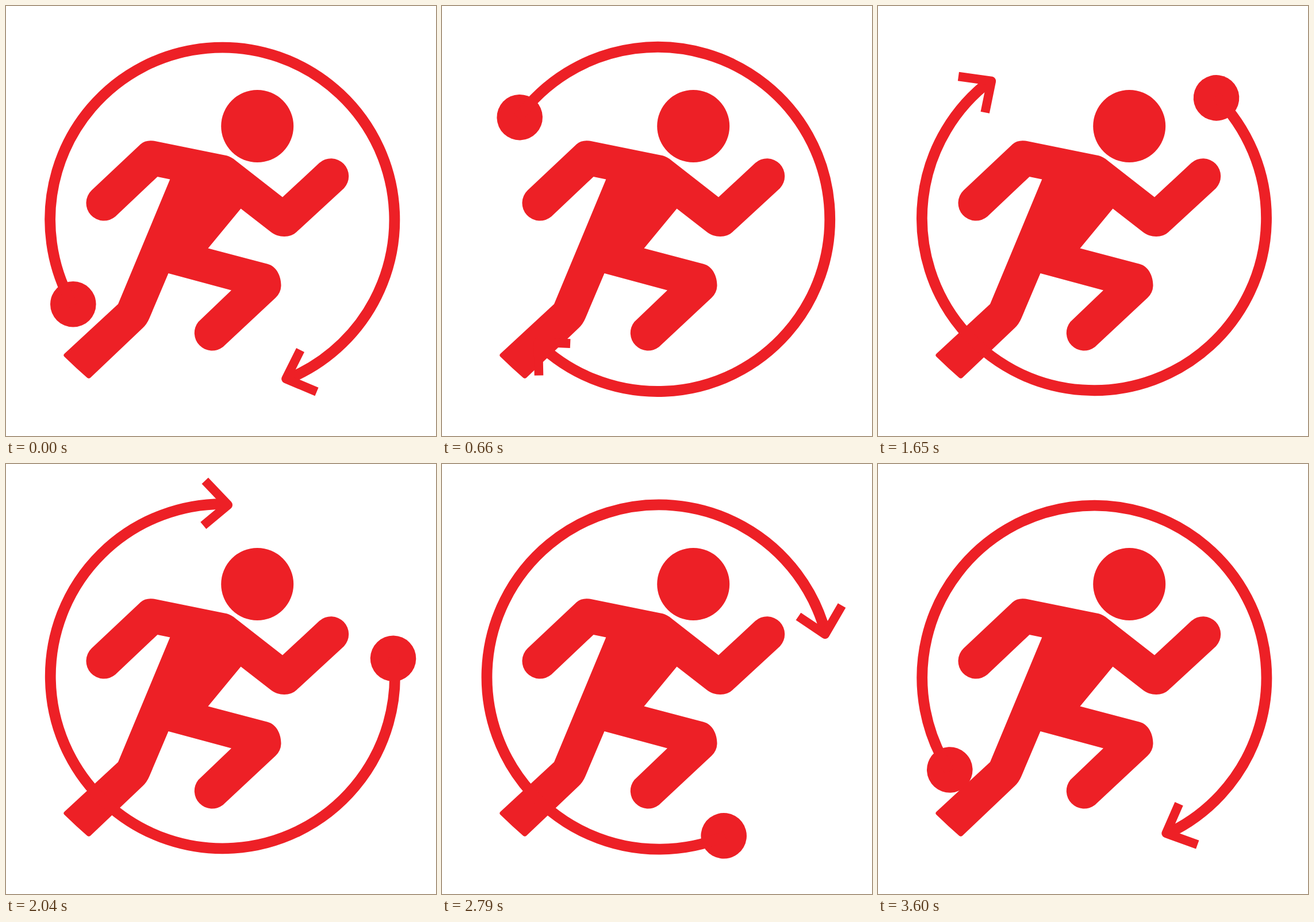
An HTML page that plays this animation: 748 px wide and 748 px high, repeating every 3.63 s.

```html
<!DOCTYPE html>
<html lang="en">
<head>
<meta charset="utf-8">
<title>Runner</title>
<style>
  html, body { margin: 0; width: 100%; height: 100%; overflow: hidden; background: #fff; }
  svg { display: block; width: 100vw; height: 100vh; }
</style>
</head>
<body>
<svg viewBox="0 0 748 748" fill="#ed2026">
  <circle cx="437.2" cy="209" r="63"/>
  <path d="M234 240.5 Q243 232.500 258 234.800 L384 260.300 Q391 262 399 268.500
    L481 332.500 L545 273 A30.800 30.800 0 0 1 588 317
    L505.500 393 C495 403.500 474 404 460 392.500
    L408.500 352.500 L351.500 421.500 L455 448.800 C471 453 479 471 478.500 487
    Q478 499 469 507.500 L377.500 593 A30.800 30.800 0 0 1 334.500 549.500
    L392 494.500 L282.500 465 L249.500 543 Q245 553.500 238 560
    L147 646.500 Q144 649 141 646.500 L122 629.500 L101.500 610 Q99 607.500 101.500 605
    L195 518.500 L285.300 301.500 L263.500 297 L190.500 366
    A30.800 30.800 0 0 1 149 320.500 Z"/>
  <g id="orbit">
    <circle cx="116.8" cy="518.8" r="39.8"/>
    <g fill="none" stroke="#ed2026">
      <path d="M116.800 521.500 A299.600 299.600 0 1 1 488.500 649.500" stroke-width="18.800"/>
      <path d="M512 598.500 L487 648.500 L540.500 671" stroke-width="15.600" stroke-linejoin="round"/>
    </g>
  </g>
</svg>
<script>
  const STEP = 30, STEPS = 121, HALF = 60;
  const orbit = document.getElementById('orbit');

  // Two half turns: 60 steps, then 61 slightly smaller ones.
  const angleAt = n => n < HALF ? n * 180 / HALF : 180 + (n - HALF) * 180 / (STEPS - HALF);

  const start = performance.now();
  function draw(now) {
    const n = Math.floor(Math.max(0, now - start) / STEP) % STEPS;
    orbit.setAttribute('transform', `rotate(${angleAt(n)} 376.3 370.4)`);
    requestAnimationFrame(draw);
  }
  draw(start);
</script>
</body>
</html>
```
